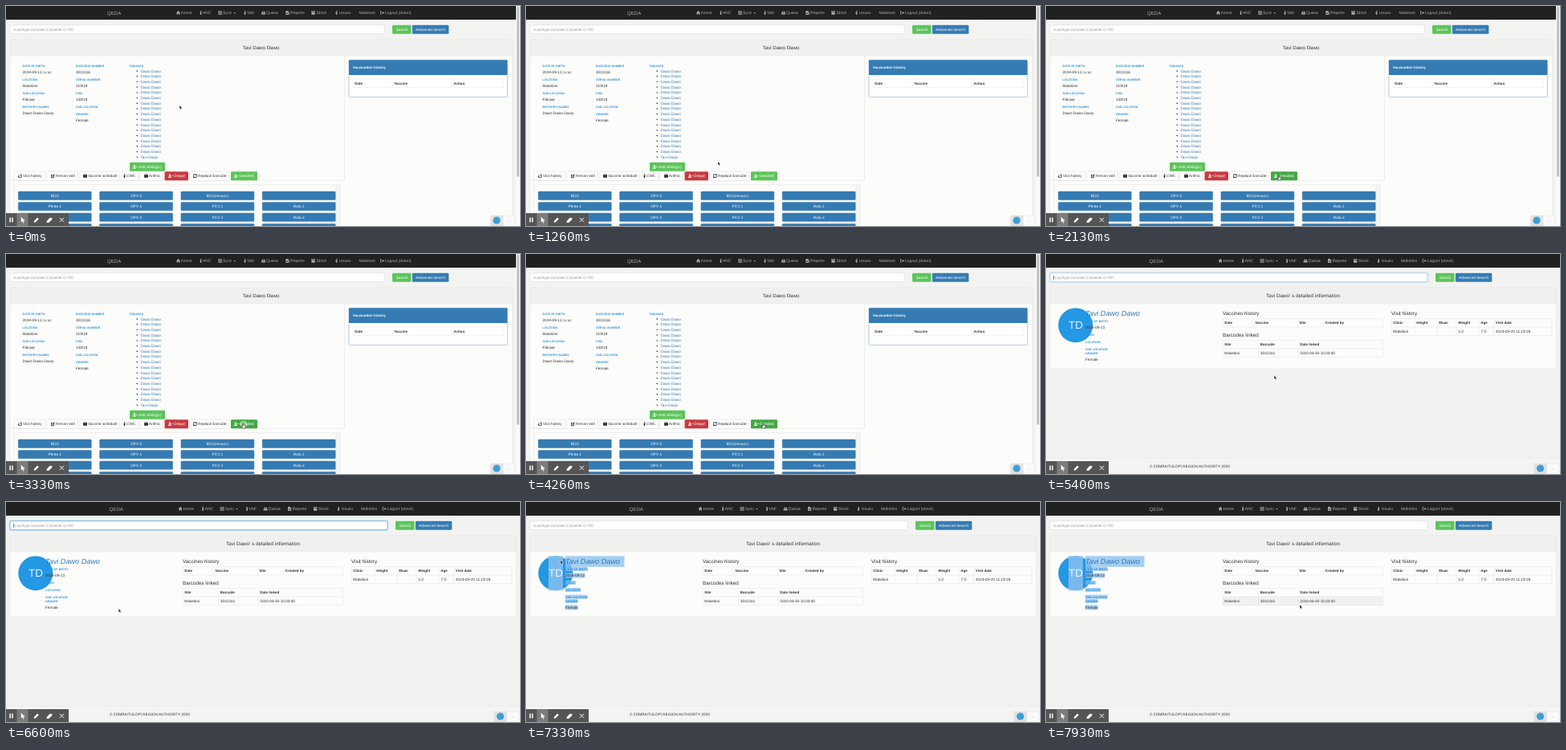
Recreate the animation shown at these times as an HTML page. Size 640 by 274 pixels, loop 8000 ms.

```html
<!DOCTYPE html>
<html lang="en">
<head>
<meta charset="utf-8">
<title>Patient record</title>
<style>
  html, body { margin: 0; width: 100%; height: 100%; overflow: hidden; background: #f2f2f0; }
  svg { display: block; width: 100vw; height: 100vh; }
  text { font-family: "Liberation Sans", Arial, sans-serif; text-rendering: geometricPrecision; white-space: pre; }
</style>
</head>
<body>
<svg id="stage" viewBox="0 0 640 274"></svg>
<script>
const LOOP = 8000, BODY = 4.72;
const BLUE = '#357bb3', GREEN = '#5cc55a', DARK_GREEN = '#43a844', RED = '#c93a42';
const INK = '#333', LABEL = '#2f93dc', LINE = '#ddd';
const PLACE = 'Makeloni', PERSON = 'Tavi Dawo';

// Drawing helpers, each returning SVG markup
const text = (x, y, s, fill = INK, size = BODY, extra = '') =>
  `<text x="${x}" y="${y}" font-size="${size}" fill="${fill}" ${extra}>${s}</text>`;
const middle = (x, y, s, fill, size) => text(x, y, s, fill, size, 'text-anchor="middle"');
const bold = (x, y, s, fill = INK, size = 4.5) => text(x, y, s, fill, size, 'font-weight="700"');
const label = (x, y, s) => bold(x, y, s, LABEL, 3.65);
const rect = (x, y, w, h, fill, stroke = 'none', r = 0, extra = '') =>
  `<rect x="${x}" y="${y}" width="${w}" height="${h}" rx="${r}" fill="${fill}" stroke="${stroke}" stroke-width=".4" ${extra}/>`;
const path = (d, fill, extra = '') => `<path d="${d}" fill="${fill}" ${extra}/>`;
const group = (id, content, extra = '') => `<g id="${id}" ${extra}>${content}</g>`;

const ICONS = {
  home: 'M0 2.5L2.5 0 5 2.5H4.3V4.8H3V3.2H2V4.8H.7V2.5z',
  figure: 'M1 0h1.4v1.3H1zM.4 1.7h2.2v1.6H2.2V5H.9V3.3H.4z',
  list: 'M0 .3h5v1H0zM0 2h5v1H0zM0 3.7h5v1H0z',
  users: 'M.6.8h1.6v1.6H.6zM2.8.8h1.6v1.6H2.8zM0 2.8h5v1.8H0z',
  box: 'M0 .3h5v1.3H0zM.4 2h4.2v2.7H.4z',
  sheet: 'M.4 0h3v1.3h1.2V5H.4zM1.2 2v.5h2.6V2zM1.2 3.2v.5h2.6v-.5z',
  exit: 'M0 .4h2v.7H.8v2.8H2v.7H0zM1.8 2h1.4V.9L5 2.5 3.2 4.1V3H1.8z',
  clock: 'M2.5 0a2.5 2.5 0 1 1-2.3 1.5l.7.3A1.8 1.8 0 1 0 2.5.7zM2.2 1.2h.6v1.3l.9.5-.3.5-1.2-.7z',
  edit: 'M0 .8h2.8l-.7.7H.7v2.8h2.8V3l.7-.7V5H0zM1.5 2.8L4.2 0l.8.8-2.7 2.8-1 .2z',
  case: 'M1.5 0h2v1H5v3.6H0V1h1.5zM2 .5V1h1V.5z',
  swap: 'M0 2.2A2.5 2.5 0 0 1 4.3.8L5 .2V2H3.1l.6-.6A1.8 1.8 0 0 0 .8 2.2zM5 2.8A2.5 2.5 0 0 1 .7 4.2L0 4.8V3h1.9l-.6.6a1.8 1.8 0 0 0 2.9-.8z',
  user: 'M1.9.2a1.2 1.2 0 1 1 0 2.4 1.2 1.2 0 1 1 0-2.4zM0 4.7Q0 2.8 1.9 2.8T3.8 4.7zM3.9 2h2v.7h-2z'
};
const icon = (kind, x, y, fill) => path(ICONS[kind], fill, `transform="translate(${x} ${y})" fill-rule="evenodd"`);

const button = (x, y, w, s, fill, tx, kind, id = '') => {
  const plain = fill === '#fff', ink = plain ? INK : '#fff';
  return rect(x, y, w, 11, fill, plain ? '#ccc' : 'none', 1.3, id && `id="${id}"`) +
    (kind ? icon(kind, tx - (kind === 'user' ? 7 : kind === 'figure' ? 4 : 6), y + 3, ink) : '') +
    text(tx, y + 7.2, s, ink);
};

// Bordered table: x holds the column edges, rows the cell texts, first row bold
const table = (x, y, right, rows, rowHeight = 10.6) => {
  const height = rows.length * rowHeight;
  let out = rect(x[0], y, right - x[0], height, 'none', LINE);
  for (const edge of x.slice(1)) out += path(`M${edge} ${y}v${height}`, 'none', `stroke="${LINE}" stroke-width=".4"`);
  rows.forEach((row, r) => {
    if (r) out += path(`M${x[0]} ${y + r * rowHeight}H${right}`, 'none', `stroke="${LINE}" stroke-width=".5"`);
    row.forEach((s, c) => out += (r ? text : bold)(x[c] + 2.3, y + r * rowHeight + 6.9, s));
  });
  return out;
};

function navbar(shift) {
  const items = [['home', 212, 218, 'Home'], ['figure', 241, 245, 'ANC'], ['list', 264, 270, 'Sync'],
    ['figure', 296, 300, 'VMI'], ['users', 318, 324, 'Queue'], ['sheet', 348, 354, 'Reports'],
    ['box', 380, 386.5, 'Stock'], ['figure', 410, 415, 'Issues'], ['', 0, 439.5, PLACE],
    ['exit', 466, 472, 'Logout (otavri)']];
  return rect(0, 0, 640, 17, '#212121') + `<g transform="translate(${shift})">` +
    text(126, 10.7, 'QEDA', '#aaa', 6.1) +
    items.map(([kind, ix, tx, s]) => (kind ? icon(kind, ix, 6, '#aaa') : '') + text(tx, 10.2, s, '#aaa', 5.05)).join('') +
    path('M283.5 8h2.6l-1.3 1.5z', '#aaa') + '</g>';
}

const searchBar = (right) =>
  rect(5, 23.7, right - 5, 11, '#fff', '#ccc', 1.3) +
  text(9, 30.9, 'Scan/type barcode in booklet or PID', '#999') +
  button(right + 10, 23.7, 23.5, 'Search', GREEN, right + 14.5) +
  button(right + 34.8, 23.7, 45.5, 'Advanced Search', BLUE, right + 39);

const cornerTiles = (x) =>
  rect(x, 261, 15, 13, '#e2e2e0', '#d2d2d0') + `<circle cx="${x + 7.5}" cy="267" r="4.6" fill="#3f9fd5"/>` +
  rect(x + 16, 261, 14.5, 13, '#fafafa', '#e2e2e2') + text(x + 22.5, 268.5, '‹', '#aaa');

function summaryPage() {
  let out = rect(0, 0, 640, 274, '#f3f3f1') + navbar(0) + searchBar(471) +
    rect(5, 42, 625.5, 240, '#fcfcfb', LINE, 1) + rect(5, 42, 625.5, 20, '#f0f0ef', LINE, 1) +
    middle(317.5, 53.9, PERSON + ' Dawo', INK, 6.13) +
    path('M5 217.3H421.5V62', 'none', 'stroke="#e3e3e3" stroke-width=".6"');

  const fields = [
    [20.5, 76, 'DATE OF BIRTH', '2019-09-13'], [20.5, 93.2, 'LOCATION', PLACE],
    [20.5, 110.2, 'SUB LOCATION', 'Poluwe'], [20.5, 127.3, "MOTHER'S NAMES", 'Dawo Dawo Dawo'],
    [87, 76, 'BARCODE NUMBER', '3011016'], [87, 93.2, 'SERIAL NUMBER', '219/19'],
    [87, 110.2, 'CWC', '148/19'], [87, 127.3, 'SUB LOCATION', ''], [87, 136, 'GENDER', 'Female']];
  for (const [x, y, name, value] of fields) out += label(x, y, name) + text(x, y + 8, value);
  out += text(46, 84, '(11 M)', INK, 3.7) + label(154, 76, 'SIBLINGS');
  for (let i = 0; i < 17; i++) {
    const y = 82.5 + i * 6.71;
    out += `<circle cx="163.3" cy="${y - 1.6}" r=".8" fill="${INK}"/>` +
      text(167.5, y, i < 16 ? 'Dawo Dawo' : PERSON, BLUE);
  }
  out += button(154, 194.8, 44, 'Add sibling(s)', GREEN, 165, 'user');
  const actions = [[10, 38.5, 'Visit history', '#fff', 21, 'clock'], [51, 38.5, 'Person edit', '#fff', 62, 'edit'],
    [92, 49, 'Vaccine schedule', '#fff', 102, 'case'], [144, 20.5, 'CWC', '#fff', 150, 'figure'],
    [167, 28, 'Anthro', '#fff', 178, 'case'], [197.5, 29.5, 'Deque', RED, 209, 'user'],
    [229, 49, 'Replace barcode', '#fff', 239, 'swap'], [280, 33, 'Detailed', GREEN, 291, 'user', 'detailed']];
  for (const [x, w, ...rest] of actions) out += button(x, 206.2, w, ...rest);

  out += rect(10, 222.5, 406, 60, '#fcfcfb', LINE) + rect(411, 222.5, 5, 60, '#f4f4f4', '#e4e4e4');
  const doses = [['BCG', 'OPV 0', 'BCG(revacc)', ''], ['Penta 1', 'OPV 1', 'PCV 1', 'Rota 1'],
    ['Penta 2', 'OPV 2', 'PCV 2', 'Rota 2'], ['', '', '', '']];
  doses.forEach((row, r) => row.forEach((s, c) => {
    const x = 15.3 + c * 101.3, y = 231 + r * 13.45;
    out += rect(x, y, 91, 10.4, BLUE, '#2e6da4', 1) + middle(x + 45.5, y + 6.9, s, '#fff');
  }));

  return out + rect(427, 67.3, 197.3, 46, '#fff', BLUE, 1.3) + rect(427, 67.3, 197.3, 18.7, BLUE, 'none', 1) +
    bold(432, 78.4, 'Vaccination history', '#fff', 4.45) +
    table([432, 481, 555], 91, 619, [['Date', 'Vaccine', 'Action']]) + cornerTiles(603.5) +
    rect(635, 0, 5, 274, '#fafafa') + rect(636, .8, 3, 212, '#c1c1c1', 'none', 1.5);
}

// Highlighted boxes: x, y, width, height
const SELECTION = [[28, 67.3, 18, 43], [49, 67.3, 73.5, 13.5], [49, 81, 27.5, 5], [49, 88.5, 24, 6], [49, 98, 13, 4.8],
  [49, 107, 19, 4.8], [49, 115.6, 27.5, 4.9], [49, 120.9, 15.5, 5], [49, 128.3, 15.5, 6]];

function detailPage() {
  return rect(0, 0, 640, 274, '#f2f2f0') + navbar(2.6) + searchBar(475) +
    group('focus', rect(4.4, 23.1, 471.2, 12.2, 'none', '#b9dcf7', 1.8, 'style="stroke-width:1.2"') +
      rect(5, 23.7, 470, 11, 'none', '#66afe9', 1.3, 'style="stroke-width:.7"')) +
    group('caret', rect(9, 26.6, .45, 5.4, '#222')) +
    rect(5, 42, 630, 101, '#fcfcfb', LINE, 1) + rect(5, 42, 630, 20, '#f0f0ef', LINE, 1) +
    middle(320, 53.9, PERSON + "' s detailed information", INK, 6.3) +
    '<circle cx="36.8" cy="88.7" r="21.5" fill="#2398e4"/>' +
    SELECTION.map((box) => rect(...box, '#8fc4f2', 'none', 0, 'class="mark" opacity=".8"')).join('') +
    middle(36.9, 93.2, 'TD', '#e8f4fd', 13.4) +
    text(49, 77.3, PERSON + ' Dawo', BLUE, 9.1, 'font-style="italic"') +
    label(49, 84.8, 'DATE OF BIRTH') + text(49, 93.1, '2019-09-13') + label(49, 101.8, 'PIDNC') +
    label(49, 110.8, 'LOCATION') + label(49, 119.5, 'SUB LOCATION') + label(49, 124.9, 'GENDER') +
    text(49, 133, 'Female') +
    text(220, 75.5, 'Vaccines history', INK, 6.3) +
    table([220, 258, 313, 345.5], 80.4, 419.5, [['Date', 'Vaccine', 'Site', 'Created by']]) +
    text(220, 102.8, 'Barcodes linked', INK, 6.3) +
    group('rowHover', rect(220, 118, 199.5, 10.6, '#f1f1f0')) +
    table([220, 264.5, 314], 107.3, 419.5, [['Site', 'Barcode', 'Date linked'], [PLACE, '3011016', '2020-06-30 15:03:00']]) +
    text(430, 75.5, 'Visit history', INK, 6.3) +
    table([430, 459, 487, 511, 539, 557.5], 80.4, 630, [['Clinic', 'Height', 'Muac', 'Weight', 'Age', 'Visit date'],
      [PLACE, '', '', '4.2', '7 D', '2019-09-20 11:19:28']]) +
    rect(0, 254, 640, 20, '#f4f4f3') + path('M0 254H640', 'none', 'stroke="#e2e2e0" stroke-width=".5"') +
    text(129, 266.2, '© ZOMRA/TULOPI REGION AUTHORITY 2020') + cornerTiles(608);
}

const toolbar = rect(0, 258, 78, 16, '#555') + rect(13.5, 258, 14, 16, '#7b7b7b') +
  path('M4.4 263.6h1.5v5.6H4.4zM7.3 263.6h1.5v5.6H7.3z', '#fff') +
  path('M18.8 262.8l5 4.8h-2.4l1.2 2.5-1.1.5-1.2-2.5-1.5 1.5z', '#fff') +
  path('M34.7 269.8l.5-2.2 4-4 1.7 1.7-4 4z', '#fff') +
  path('M50.4 268.3l4.2-4.6 3 .4-.6 2.1-4 3.7-2.4-.2z', '#fff') +
  path('M67 263.8l5 5M72 263.8l-5 5', 'none', 'stroke="#fff" stroke-width="1"');

const pointer = group('pointer',
  group('arrow', path('M0 0V4.7L1.1 3.7 1.9 5.4 2.7 5 1.9 3.4H3.3z', '#111', 'stroke="#fff" stroke-width=".4"')) +
  group('hand', path('M-.6 0h1v2l2.3.6v2L2 6H-1L-2.3 3.6l.5-.4 1.2.8z', '#fff', 'stroke="#111" stroke-width=".55"')));

const stage = document.getElementById('stage');
stage.innerHTML = group('summary', summaryPage()) + group('detail', detailPage()) + toolbar +
  '<circle id="ripple" cx="296" cy="212" fill="#fff" fill-opacity=".25" stroke="#d5efd5" stroke-width=".8"/>' + pointer;
const el = Object.fromEntries([...stage.querySelectorAll('[id]')].map((node) => [node.id, node]));
const marks = [...stage.querySelectorAll('.mark')];

// Pointer tip: time, x, y
const TRACK = [[0, 216, 123.7], [400, 216, 123.7], [1200, 238.8, 193.5], [1300, 239, 193.7], [2060, 290, 211],
  [2900, 291, 211], [3200, 295.3, 211], [4260, 295.3, 211], [4900, 297.6, 160.7], [5260, 290, 152],
  [6450, 140.2, 132.8], [6720, 140.2, 132.8], [7250, 30, 70], [7880, 316, 128], [8000, 316, 128]];
function pointerAt(t) {
  const i = Math.max(1, TRACK.findIndex(([time]) => time > t));
  const [t0, x0, y0] = TRACK[i - 1], [t1, x1, y1] = TRACK[i];
  const p = (t - t0) / (t1 - t0), e = p * p * (3 - 2 * p);
  return [x0 + (x1 - x0) * e, y0 + (y1 - y0) * e];
}

const show = (node, on) => node.style.display = on ? '' : 'none';
const clamp = (v) => Math.min(1, Math.max(0, v));
const PAGE_SWAP = 5130, FOCUS = 5330, PRESS = 6720, RELEASE = 7250;

function draw(now) {
  const t = now % LOOP, [x, y] = pointerAt(t), detail = t >= PAGE_SWAP;
  const overButton = !detail && x > 280 && x < 313 && y > 206 && y < 217.2;
  show(el.summary, !detail);
  show(el.detail, detail);
  el.detailed.setAttribute('fill', overButton || t > 3200 ? DARK_GREEN : GREEN);

  el.pointer.setAttribute('transform', `translate(${x} ${y})`);
  show(el.arrow, !overButton);
  show(el.hand, overButton);
  const click = (t - 3200) / 300;
  show(el.ripple, click >= 0 && click <= 1);
  el.ripple.setAttribute('r', 2.5 + 3 * clamp(click));

  const focused = t >= FOCUS && t < PRESS;
  el.focus.style.opacity = clamp((t - FOCUS) / 150) * clamp(1 - (t - PRESS) / 150);
  show(el.caret, focused && (t - FOCUS) % 1000 < 500);
  marks.forEach((mark, i) => {
    const [, top, , height] = SELECTION[i];
    show(mark, t >= RELEASE || (t >= PRESS && y < top + height / 2));
  });
  show(el.rowHover, x > 220 && x < 419 && y > 117 && y < 129);
}

const start = performance.now();
(function tick() {
  draw(performance.now() - start);
  requestAnimationFrame(tick);
})();
</script>
</body>
</html>
```
